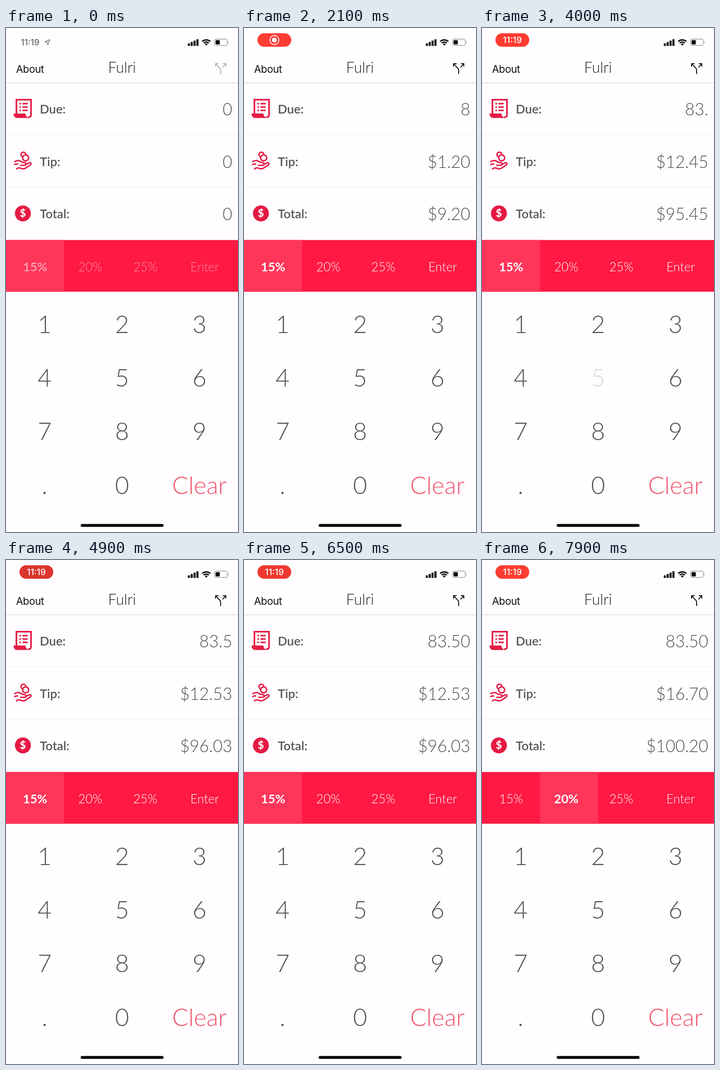
An HTML page that plays this animation: 508x1102 px, repeating every 8 s.

```html
<!DOCTYPE html>
<html lang="en">
<head>
<meta charset="utf-8">
<title>Tip calculator</title>
<style>
  html, body { margin: 0; width: 100%; height: 100%; overflow: hidden; background: #fffdff; }
  svg { display: block; width: 100vw; height: 100vh; }
  text { font-family: Lato, sans-serif; font-weight: 300; fill: #505055; }
  .sys { font-family: Inter, sans-serif; }
  .label { font-size: 27px; font-weight: 600; fill: #555558; }
  .value { font-size: 36.6px; text-anchor: end; }
  .key { font-size: 53px; text-anchor: middle; }
  .rate { font-size: 27px; text-anchor: middle; fill: #fff; }
  .line { fill: none; stroke-linecap: round; stroke-linejoin: round; }
</style>
</head>
<body>
<svg id="stage" viewBox="0 0 508 1102" xmlns="http://www.w3.org/2000/svg">
  <rect width="508" height="1102" fill="#fffdff"/>

  <g id="clock">
    <text class="sys" x="32.5" y="38" style="font-size:18.3px;font-weight:600;fill:#77777a">11:19</text>
    <path class="line" d="M96 25.5L85 30.2L90.5 31.2L91.5 37Z" stroke="#77777a" stroke-width="1.5"/>
  </g>
  <g id="pill">
    <rect id="pillBg" x="29.5" y="11.5" width="74" height="29.5" rx="14.75"/>
    <g id="rec">
      <circle cx="66.5" cy="26.3" r="10" fill="none" stroke="#fff" stroke-width="1.7"/>
      <circle cx="66.5" cy="26.3" r="5.4" fill="#fff"/>
    </g>
    <text id="pillTime" class="sys" x="66.5" y="33" text-anchor="middle" style="font-size:19px;font-weight:500;fill:#fff">11:19</text>
  </g>

  <g id="bars"></g>
  <g class="line" stroke="#0c0c0e" style="stroke-linecap:butt" stroke-width="3">
    <path d="M429.6 29.4A13 13 0 0 1 447.4 29.4"/>
    <path d="M432.9 33A8.2 8.2 0 0 1 444.1 33"/>
  </g>
  <path d="M438.5 38.6L435.2 35.4A4.8 4.8 0 0 1 441.8 35.4Z" fill="#0c0c0e"/>
  <rect x="456.6" y="24.3" width="28" height="14" rx="4.2" fill="none" stroke="#9b9b9f" stroke-width="1.4"/>
  <rect x="458.8" y="26.5" width="9.4" height="9.6" rx="2" fill="#0c0c0e"/>
  <path d="M486.3 29a2.6 2.6 0 0 1 0 4.8z" fill="#9b9b9f"/>

  <text class="sys" x="22" y="98" style="font-size:22.5px;font-weight:400;fill:#111114;letter-spacing:-.45px">About</text>
  <text x="254" y="98" text-anchor="middle" style="font-size:32.5px;fill:#222225">Fulri</text>
  <path id="split" class="line" stroke="#111114" stroke-width="2"
    d="M470 100.5V92.5Q470 90 468.2 88L459.3 78.4M459 84.5V78H465.5M474 86.2L481 78.4M475 78H481.3V84.5" style="stroke-linecap:butt;stroke-linejoin:miter"/>
  <path d="M0 119.8H508" stroke="#d9d8db" stroke-width="1.5"/>
  <path d="M0 233.8H508M0 348.2H508" stroke="#f3f1f5" stroke-width="1.4"/>

  <g fill="#e51a44" stroke="#e51a44">
    <path d="M22.8 188V156.8H54.8V189.5Q54.8 195 49.5 195" class="line" stroke-width="3.6" style="stroke-linejoin:miter"/>
    <path d="M16.4 187H42.5Q42.8 193 49 196.8H25Q16.4 196.8 16.4 187Z" stroke="none"/>
    <path d="M29.3 165.3h3.6M36 165.3h11.6M29.3 172.8h3.6M36 172.8h11.6M29.3 180.2h3.6M36 180.2h11.6" stroke-width="3.2"/>
  </g>
  <g class="line" stroke="#e51a44" stroke-width="3">
    <circle cx="43" cy="284" r="6.6"/>
    <path d="M34.5 281A5.4 5.4 0 1 1 43.3 275.6"/>
    <path d="M19 292.3Q26.5 287.5 33 292Q36 294.3 41 294.5Q44.5 295 44.2 298Q43.5 300.3 39 300.2H32"/>
    <path d="M44.5 297.8L50.5 294.8Q55 293.6 54.8 297Q54.5 299 51.5 300.8L42.5 306.6Q39 308.8 35 307.5L30 306Q26.5 305.2 23 308"/>
    <path d="M19 298.5Q22.5 296.8 25.5 297.5"/>
  </g>
  <circle cx="37" cy="405.4" r="17.5" fill="#e51a44"/>
  <text x="37" y="413.3" text-anchor="middle" style="font-size:23px;font-weight:800;fill:#fff">$</text>

  <g id="rows"></g>
  <rect y="463.6" width="508" height="113" fill="#ff1943"/>
  <rect id="pick" y="463.6" width="127" height="113" fill="#ff355a"/>
  <g id="rates"></g>
  <g id="keys"></g>
  <rect x="163.5" y="1084.4" width="181.5" height="6.4" rx="3.2" fill="#000"/>
</svg>
<script>
const LOOP = 8000;
const RATE_AT = 6900;
const presses = [
  [1700, '8'], [2450, '3'], [3320, '.'], [4100, '5'], [5900, '0']
];

const $ = id => document.getElementById(id);
const clamp = v => Math.max(0, Math.min(1, v));
const ramp = (t, a, b) => clamp((t - a) / (b - a));

function add(parent, tag, attrs, content = '') {
  const el = document.createElementNS('http://www.w3.org/2000/svg', tag);
  for (const name in attrs) el.setAttribute(name, attrs[name]);
  el.textContent = content;
  $(parent).appendChild(el);
  return el;
}

for (let i = 0; i < 4; i++) {
  const h = 5.6 + i * 3;
  add('bars', 'rect', { x: 398 + i * 6.3, y: 39.2 - h, width: 4.6, height: h, rx: 1.2, fill: '#0c0c0e' });
}

const values = ['Due:', 'Tip:', 'Total:'].map((name, i) => {
  const y = 187 + i * 114.5;
  add('rows', 'text', { class: 'label', x: 74, y }, name);
  return add('rows', 'text', { class: 'value', x: 495.5, y: y + 4 });
});

const rates = [['15%', 63.7], ['20%', 184.5], ['25%', 305], ['Enter', 435]].map(
  ([name, x]) => add('rates', 'text', { class: 'rate', x, y: 532 }, name));

const keys = {};
['1', '2', '3', '4', '5', '6', '7', '8', '9', '.', '0', 'Clear'].forEach((name, i) => {
  keys[name] = add('keys', 'text', {
    class: 'key', x: 84.5 + (i % 3) * 169.5, y: 667 + Math.floor(i / 3) * 117.2
  }, name);
});
keys.Clear.style.fill = '#f0546a';

// Dims at touch down, fades back after release.
function touch(t, at) {
  if (t < at - 130) return 1;
  return 0.2 + 0.8 * ramp(t, at, at + 300);
}

const money = v => '$' + (Math.round(v * 100 + 1e-6) / 100).toFixed(2);

function draw(t) {
  const typed = presses.filter(p => t >= p[0]).map(p => p[1]).join('');
  const due = parseFloat(typed) || 0;
  const choice = t >= RATE_AT ? 1 : 0;
  const tip = due * (choice ? 0.2 : 0.15);
  const shown = due ? [typed, money(tip), money(due + tip)] : ['0', '0', '0'];
  values.forEach((el, i) => { el.textContent = shown[i]; });

  for (const [at, name] of presses) keys[name].setAttribute('opacity', touch(t, at));

  $('pick').setAttribute('x', choice * 127);
  rates.forEach((el, i) => {
    el.style.fontWeight = i === choice ? 700 : 300;
    el.setAttribute('opacity', due ? 1 : 0.5);
  });
  $('split').setAttribute('opacity', due ? 1 : 0.33);

  const glow = 0.5 + 0.5 * Math.cos((t - 2050) / 2000 * 2 * Math.PI);
  $('pillBg').setAttribute('fill', `rgb(${217 + 38 * glow},${52 + 8 * glow},${46 + 4 * glow})`);
  $('clock').setAttribute('opacity', 1 - ramp(t, 90, 300));
  $('pill').setAttribute('opacity', ramp(t, 100, 450));
  const swap = ramp(t, 3000, 3400);
  $('rec').setAttribute('opacity', 1 - swap);
  $('pillTime').setAttribute('opacity', swap);
}

function tick() {
  draw(performance.now() % LOOP);
  requestAnimationFrame(tick);
}
tick();
</script>
</body>
</html>
```
